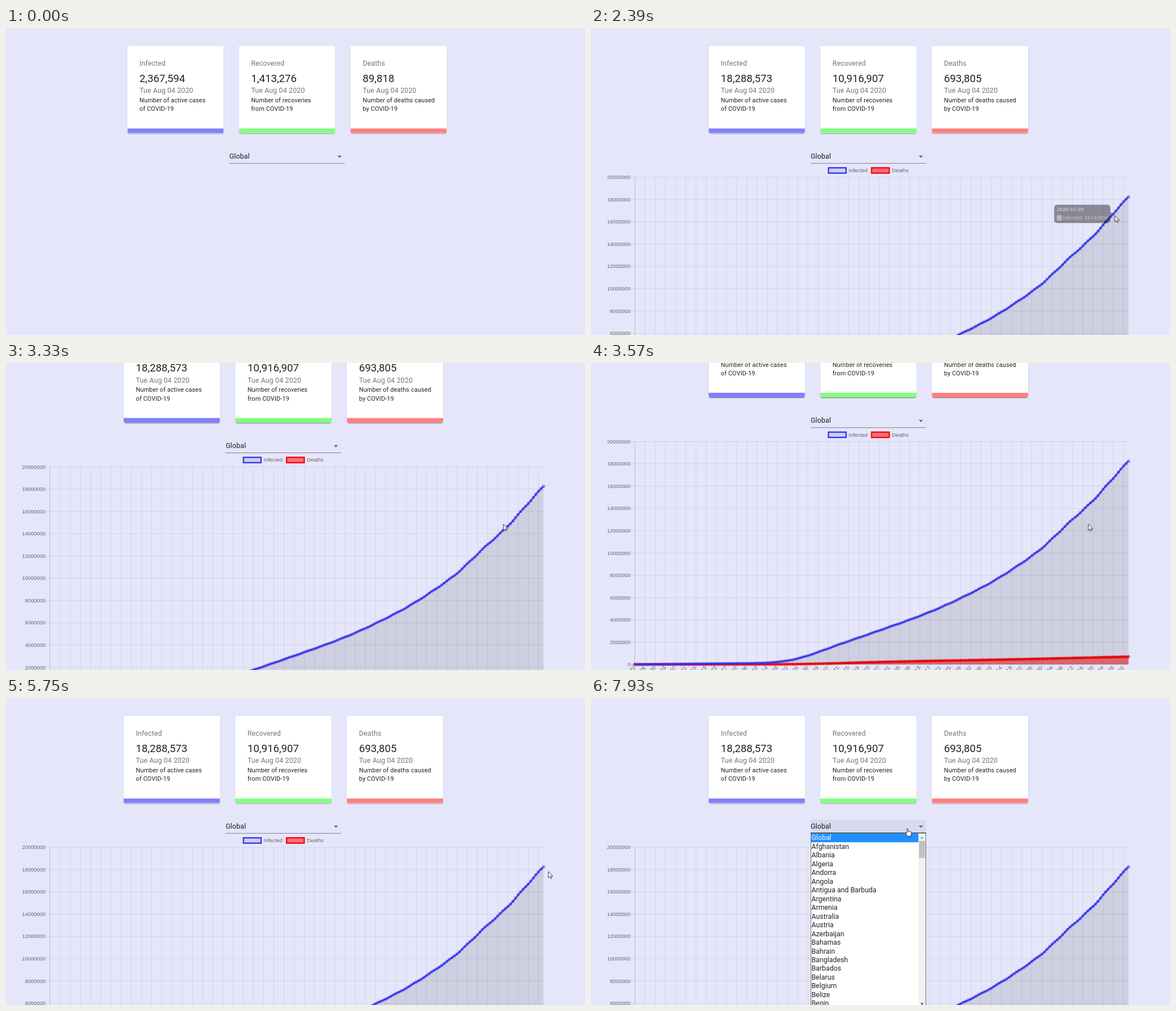
An HTML page with a canvas for the animation above (7990 ms loop, 1028 px wide and 545 px high).

```html
<!DOCTYPE html>
<html lang="en">
<head>
<meta charset="utf-8">
<title>COVID-19 dashboard</title>
<style>
html, body { margin: 0; width: 100%; height: 100%; overflow: hidden; background: #e6e6fb; }
canvas { display: block; }
</style>
</head>
<body>
<canvas id="stage" width="1028" height="545"></canvas>
<script>
const ctx = document.getElementById('stage').getContext('2d');
const LOOP = 7990;
const ROBOTO = 'Roboto, sans-serif', ARIAL = '"Liberation Sans", Arial, sans-serif';
const BLUE = '#3333ff', RED = '#ff0000';

const clamp = v => Math.max(0, Math.min(1, v));
const span = (t, a, b) => clamp((t - a) / (b - a));
const smooth = u => u * u * (3 - 2 * u);
const easeOut = u => 1 - (1 - u) ** 2;
const easeOutQuart = u => 1 - (1 - u) ** 4;

function text(str, x, y, size, color, o = {}) {
  ctx.font = `${o.weight || 400} ${size}px ${o.font || ROBOTO}`;
  ctx.letterSpacing = (o.spacing || 0) + 'px';
  ctx.textAlign = o.align || 'left';
  ctx.textBaseline = o.base || 'alphabetic';
  ctx.fillStyle = color;
  ctx.fillText(str, x, y);
}
function rect(x, y, w, h, color) {
  ctx.fillStyle = color;
  ctx.fillRect(x, y, w, h);
}
function line(x1, y1, x2, y2, color, width = 0.8) {
  ctx.strokeStyle = color;
  ctx.lineWidth = width;
  ctx.beginPath();
  ctx.moveTo(x1, y1);
  ctx.lineTo(x2, y2);
  ctx.stroke();
}
function polygon(points, color) {
  ctx.fillStyle = color;
  ctx.beginPath();
  points.forEach(([x, y]) => ctx.lineTo(x, y));
  ctx.closePath();
  ctx.fill();
}

// ---- counters
const CARDS = [
  ['Infected', 18288573, 'Number of active cases', 'of COVID-19', '#7f7fff'],
  ['Recovered', 10916907, 'Number of recoveries', 'from COVID-19', '#7fff7f'],
  ['Deaths', 693805, 'Number of deaths caused', 'by COVID-19', '#ff7f7f'],
];
const STEP = 1070 / 14;
const stepped = t => t < 150 ? 0 : 150 + STEP * Math.floor((t - 149) / STEP);
const expoTime = v => -Math.log2(1 - v / CARDS[0][1] * 1023 / 1024) / 10;
const P0 = expoTime(2367594), P1 = expoTime(17928638);
function countUp(t) {
  const p = Math.min(1, P0 + (P1 - P0) * stepped(t) / 1220);
  return (1 - 2 ** (-10 * p)) * 1024 / 1023;
}

function shadow(x, y, w, h, blur, dy, alpha) {
  ctx.save();
  ctx.shadowColor = `rgba(0,0,0,${alpha})`;
  ctx.shadowBlur = blur;
  ctx.shadowOffsetY = dy;
  ctx.fillStyle = '#fff';
  ctx.beginPath();
  ctx.roundRect(x, y, w, h, 3.1);
  ctx.fill();
  ctx.restore();
}
function drawCard(x, [title, total, line1, line2, color], part) {
  const y = 32, w = 170.8, h = 154.6, tx = x + 21.6;
  shadow(x, y, w, h, 2.4, 0.8, 0.13);
  shadow(x, y, w, h, 0.8, 0.8, 0.14);
  shadow(x + 0.8, y, w - 1.6, h, 0.8, 1.5, 0.2);
  ctx.save();
  ctx.beginPath();
  ctx.roundRect(x, y, w, h, 3.1);
  ctx.clip();
  rect(x, y, w, h, '#fff');
  rect(x, y + h - 8.2, w, 8.2, color);
  ctx.restore();
  const grey = 'rgba(0,0,0,.54)', dark = 'rgba(0,0,0,.87)';
  text(title, tx, 67.4, 12.5, grey, { spacing: 0.1 });
  text(Math.round(total * part).toLocaleString('en-US'), tx, 95.6, 18.7, dark);
  text('Tue Aug 04 2020', tx, 115.3, 12.5, grey, { spacing: 0.1 });
  text(line1, tx, 132, 10.95, dark, { spacing: 0.1 });
  text(line2, tx, 147.3, 10.95, dark, { spacing: 0.1 });
}

// ---- country select
const COUNTRIES = ('Global,Afghanistan,Albania,Algeria,Andorra,Angola,Antigua and Barbuda,Argentina,' +
  'Armenia,Australia,Austria,Azerbaijan,Bahamas,Bahrain,Bangladesh,Barbados,Belarus,Belgium,' +
  'Belize,Benin').split(',');

function drawSelect(x, hover, open) {
  if (open) rect(x, 216, 205, 24, 'rgba(0,0,0,.05)');
  text('Global', x, 231.5, 12.5, 'rgba(0,0,0,.87)', { spacing: 0.1 });
  polygon([[x + 191.8, 226.5], [x + 199.6, 226.5], [x + 195.7, 230.5]], 'rgba(0,0,0,.54)');
  if (hover) rect(x, 239, 205, 1.6, 'rgba(0,0,0,.87)');
  else rect(x, 239.8, 205, 0.9, 'rgba(0,0,0,.5)');
}
function drawList(x) {
  const row = 15.47;
  rect(x, 240, 205, 305, '#707078');
  rect(x + 1, 240.6, 203, 305, '#fff');
  rect(x + 1, 240.6, 190.5, row, '#1e90ff');
  COUNTRIES.forEach((name, i) =>
    text(name, x + 1.4, 252.4 + i * row, 12.4, i ? 'rgba(0,0,0,.87)' : '#fff'));
  rect(x + 191.5, 240.6, 12.5, 305, '#f1f1f1');
  rect(x + 192.3, 253.8, 11, 30.4, '#c1c1c1');
  const cx = x + 197.8;
  polygon([[cx - 3, 249.6], [cx + 3, 249.6], [cx, 246.4]], '#8a8a8a');
  polygon([[cx - 3, 541.6], [cx + 3, 541.6], [cx, 544.8]], '#505050');
}

// ---- chart
const LEFT = 77.9, RIGHT = 954.4, TOP = 265, BASE = 660.6, DAYS = 194;
const dayX = d => LEFT + (RIGHT - LEFT) * d / DAYS;
const valueY = v => BASE - (BASE - TOP) * v / 20;

// Smooth curve through [day, millions] knots
function curve(knots) {
  const slope = i => {
    const a = knots[Math.max(0, i - 1)], b = knots[Math.min(knots.length - 1, i + 1)];
    return (b[1] - a[1]) / (b[0] - a[0]);
  };
  return d => {
    let i = 0;
    while (i < knots.length - 2 && d > knots[i + 1][0]) i++;
    const [x0, y0] = knots[i], [x1, y1] = knots[i + 1];
    const h = x1 - x0, u = (d - x0) / h;
    return y0 + (y1 - y0) * smooth(u) +
      h * u * (1 - u) * ((1 - u) * slope(i) - u * slope(i + 1));
  };
}
const infectedCurve = curve([[0, 0], [20, .045], [40, .09], [50, .13], [55, .2], [60, .34], [64, .53],
  [70, .94], [80, 1.77], [90, 2.56], [100, 3.36], [110, 4.18], [120, 5.1], [130, 6.17], [140, 7.36],
  [150, 8.79], [160, 10.45], [170, 12.6], [180, 14.7], [188, 16.74], [194, 18.27]]);
const deathCurve = curve([[0, 0], [50, .005], [60, .015], [70, .05], [80, .11], [90, .18],
  [110, .285], [150, .46], [194, .694]]);
const series = fn => Array.from({ length: DAYS + 1 }, (_, d) => fn(d));
// Fewer cases are reported around weekends
const infected = series(d => infectedCurve(d) -
  0.16 * (infectedCurve(d) - infectedCurve(Math.max(0, d - 1))) * Math.sin(2 * Math.PI * (d - 193.5) / 7));
const deaths = series(deathCurve);

function drawSeries(data, grow, stroke, fill) {
  const points = data.map((v, d) => [dayX(d), valueY(v * grow)]);
  polygon([[LEFT, BASE], ...points, [RIGHT, BASE]], fill);
  ctx.strokeStyle = stroke;
  ctx.lineWidth = 2.35;
  ctx.lineJoin = 'round';
  ctx.beginPath();
  points.forEach(([x, y]) => ctx.lineTo(x, y));
  ctx.stroke();
  ctx.lineWidth = 0.8;
  ctx.fillStyle = fill;
  for (const [x, y] of points) {
    ctx.beginPath();
    ctx.arc(x, y, 2.35, 0, 7);
    ctx.fill();
    ctx.stroke();
  }
}
function legend(label, x, stroke, fill) {
  rect(x, 248.2, 31.3, 9.4, fill);
  ctx.strokeStyle = stroke;
  ctx.lineWidth = 2.35;
  ctx.lineJoin = 'miter';
  ctx.strokeRect(x, 248.2, 31.3, 9.4);
  text(label, x + 36, 256, 9.4, '#666', { font: ARIAL });
}
function drawChart(grow) {
  const thin = 'rgba(0,0,0,.1)', axis = 'rgba(0,0,0,.25)';
  legend('Infected', 421.6, BLUE, thin);
  legend('Deaths', 498.2, RED, 'rgba(255,0,0,.5)');
  for (let m = 0; m <= 20; m += 2) {
    const y = valueY(m);
    line(70.2, y, RIGHT, y, m ? thin : axis);
    text(String(m * 1e6), 70.2, y + 3.2, 9.4, '#666', { font: ARIAL, align: 'right' });
  }
  for (let d = 0; d <= DAYS; d += 4) {
    const x = dayX(d);
    line(x, TOP, x, BASE + 7.8, d ? thin : axis);
    ctx.save();
    ctx.translate(x - 0.5, BASE + 4.5);
    ctx.rotate(-50 * Math.PI / 180);
    text(new Date(Date.UTC(2020, 0, 22 + d)).toISOString().slice(0, 10), 0, 0, 9.4, '#666',
      { font: ARIAL, align: 'right', base: 'middle' });
    ctx.restore();
  }
  drawSeries(deaths, grow, RED, 'rgba(255,0,0,.5)');
  drawSeries(infected, grow, BLUE, thin);
}
function drawTooltip(alpha) {
  if (alpha <= 0) return;
  ctx.save();
  ctx.globalAlpha = alpha;
  ctx.fillStyle = 'rgba(0,0,0,.8)';
  ctx.beginPath();
  ctx.roundRect(822.3, 313.8, 99.8, 32.4, 4.7);
  ctx.fill();
  polygon([[922.1, 326], [926.2, 330], [922.1, 334]], 'rgba(0,0,0,.8)');
  text('2020-07-28', 827, 325.4, 9.4, '#fff', { font: ARIAL, weight: 700 });
  rect(827, 332.3, 9.2, 9.2, '#e6e6e6');
  text('Infected: 16740006', 837.8, 340, 9.4, '#fff', { font: ARIAL });
  ctx.restore();
}

// ---- pointer: [time, x, y], eased between stops
const PATH = [[1680, 953, 520], [1850, 953, 520], [2390, 930, 333], [2690, 930, 333],
  [3170, 883, 286], [4490, 883, 286], [4850, 930, 381], [5190, 963, 308], [6600, 963, 308],
  [7210, 609, 234], [7300, 609, 234], [7380, 601, 237], [7560, 601, 237], [7800, 562, 232]];

function pointerAt(t) {
  let i = 0;
  while (i < PATH.length - 2 && t > PATH[i + 1][0]) i++;
  const [t0, x0, y0] = PATH[i], [t1, x1, y1] = PATH[i + 1];
  const u = smooth(span(t, t0, t1));
  return [x0 + (x1 - x0) * u, y0 + (y1 - y0) * u];
}
const ARROW = new Path2D('M0 0V11.2L2.6 8.8L4.3 12.6L6 11.9L4.4 8.2H7.9Z');
const HAND = new Path2D('M-1 .8Q0-.6 1 .8V5Q2.2 4.2 3 5.2Q4.3 4.5 5 5.6Q6.6 5.2 6.8 6.8V9.4' +
  'Q6.6 11.4 5.6 12.4V13.6H-.6V12.4L-3.8 8Q-4 6.4-2.4 6.9L-1 8.2Z');

function drawPointer(t) {
  if (t < PATH[0][0]) return;
  const [x, y] = pointerAt(t), shape = x < 595 ? HAND : ARROW;
  ctx.save();
  ctx.translate(x, y);
  ctx.lineJoin = 'round';
  ctx.lineWidth = 0.9;
  ctx.fillStyle = '#fff';
  ctx.strokeStyle = '#222';
  ctx.fill(shape);
  ctx.stroke(shape);
  ctx.restore();
}

function draw(t) {
  const loaded = t >= 150, open = t >= 7840;
  const hover = t > 7500 && pointerAt(t)[0] < 595;
  const shift = loaded ? 0 : 6.5;
  const scroll = 125.5 * (easeOut(span(t, 3170, 3570)) - easeOut(span(t, 5460, 5750)));
  const part = countUp(t);

  rect(0, 0, 1028, 545, '#e6e6fb');
  ctx.save();
  ctx.translate(0, -scroll);
  CARDS.forEach((card, i) => drawCard(209 + shift + i * 198.1, card, part));
  drawSelect(390 + shift, hover, open);
  if (loaded) drawChart(easeOutQuart(span(stepped(t), 150, 1050)));
  drawTooltip(span(t, 2310, 2470) - span(t, 2540, 2700));
  if (open) drawList(390);
  ctx.restore();
  drawPointer(t);
}

const start = performance.now();
function tick() {
  draw((performance.now() - start) % LOOP);
  requestAnimationFrame(tick);
}
tick();
</script>
</body>
</html>
```
